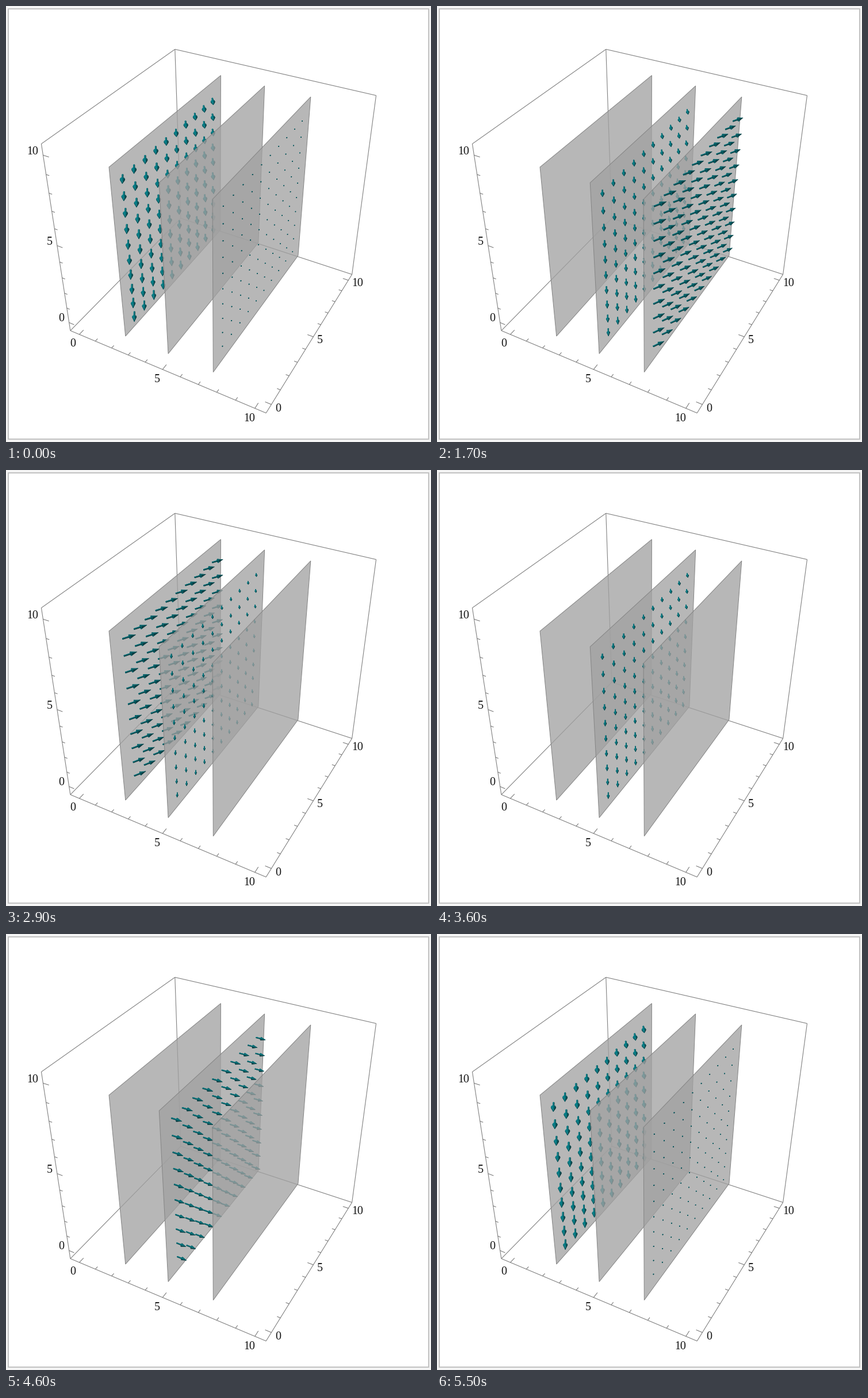
These frames come from a looping animation (739 px wide and 758 px high, 6000 ms). A matplotlib script:

```python
import itertools

import numpy as np
import matplotlib.pyplot as plt
from matplotlib.animation import FuncAnimation
from matplotlib.collections import LineCollection, PolyCollection
from matplotlib.patches import Polygon, Rectangle

W, H, DPI = 739, 758, 100
LO, HI = -0.57, 10.57
SLICES = (2.5, 5, 7.5)
SIDES = 10
TEAL = np.array([0.0, 0.50, 0.54])
LIGHT = np.array([-0.35, -0.40, 0.85])
PX = 72 / DPI

# Box corners and slice corners in space, with their places on the stage
BOX = {
    (LO, LO, LO): (112, 564), (HI, LO, LO): (452, 707), (HI, HI, LO): (601, 466),
    (LO, HI, LO): (303, 367), (LO, LO, HI): (61, 240), (LO, HI, HI): (294, 76),
    (HI, HI, HI): (643, 155),
}
SLICE_CORNERS = (
    ((208, 574), (179, 280), (373, 121), (373, 390)),
    ((282, 605), (266, 307), (450, 139), (440, 413)),
    ((360, 637), (360, 336), (530, 157), (508, 435)),
)

# Heading (degrees in the x-y plane) and length of the arrows on each slice
KEYS = (0, 5, 13, 25)
HEADINGS = ((-57, -108, -182, -300), (150, 58, -58, -60), (95, -62, -298, -620))
LENGTHS = ((0.70, 0.68, 0.66, 0.64), (0.53, 0.53, 0.50, 0.32), (0.62, 0.65, 0.62, 0.62))


def solve_camera():
    pairs = list(BOX.items())
    for x, corners in zip(SLICES, SLICE_CORNERS):
        space = ((x, 0, 0), (x, 0, 10), (x, 10, 10), (x, 10, 0))
        pairs += zip(space, corners)
    rows, rhs = [], []
    for (x, y, z), (u, v) in pairs:
        rows.append([x, y, z, 1, 0, 0, 0, 0, -u * x, -u * y, -u * z])
        rows.append([0, 0, 0, 0, x, y, z, 1, -v * x, -v * y, -v * z])
        rhs += [u, v]
    p = np.linalg.lstsq(np.array(rows, float), np.array(rhs, float), rcond=None)[0]
    return np.append(p, 1).reshape(3, 4)


CAM = solve_camera()
EYE = -np.linalg.inv(CAM[:, :3]) @ CAM[:, 3]


def project(points):
    h = np.asarray(points, float) @ CAM[:, :3].T + CAM[:, 3]
    return h[..., :2] / h[..., 2:]


def frustum(d, r0, s0, r1, s1):
    """Side faces between two rings at distances s0 and s1 along d."""
    a = np.linspace(0, 2 * np.pi, SIDES + 1)[:, None]
    across = np.array([-d[1], d[0], 0])
    rim = np.cos(a) * across + np.sin(a) * np.array([0, 0, 1])
    start, end = d * s0 + r0 * rim, d * s1 + r1 * rim
    return np.stack([start[:-1], start[1:], end[1:], end[:-1]], axis=1)


def arrow_parts(heading, size):
    """Direction, shaft faces and head faces, or None behind the slice."""
    t = np.radians(heading)
    d = np.array([np.cos(t), np.sin(t), 0])
    if d[0] < -0.1:
        return None
    if d[0] < 0:
        # lying in the slice: only the tail shows
        return d, frustum(d, 0.018, 0, 0.018, 0.03), frustum(d, 0, 0, 0.018, 0)
    thin, wide, neck = 0.052 * size, 0.16 * size, 0.52 * size
    shaft = np.concatenate([frustum(d, thin, 0, thin, neck), frustum(d, 0, 0, thin, 0)])
    head = np.concatenate([frustum(d, wide, neck, 0, size), frustum(d, 0, neck, wide, neck)])
    return d, shaft, head


def arrow_polys(x, heading, size):
    parts = arrow_parts(heading, size)
    if parts is None:
        return [], []
    d, shaft, head = parts
    to_eye = EYE - np.array([x, 5, 5])
    order = (shaft, head) if d @ to_eye > 0 else (head, shaft)
    faces = np.concatenate(order)
    normals = np.cross(faces[:, 2] - faces[:, 0], faces[:, 3] - faces[:, 1])
    normals /= np.linalg.norm(normals, axis=1, keepdims=True)
    seen = normals @ to_eye > 0
    faces, normals = faces[seen], normals[seen]
    shade = 0.40 + 0.62 * np.clip(normals @ LIGHT, 0, 1)
    polys = project(TAILS[x][:, None, None] + faces).reshape(-1, 4, 2)
    return polys, np.tile(shade[:, None] * TEAL, (len(TAILS[x]), 1))


steps = 10 * np.arange(1, 11) / 11
TAILS = {x: np.array([(x, y, z) for y, z in itertools.product(steps[::-1], steps)])
         for x in SLICES}

fig = plt.figure(figsize=(W / DPI, H / DPI), dpi=DPI, facecolor="#f4f4f4")
ax = fig.add_axes((0, 0, 1, 1))
ax.set_xlim(0, W)
ax.set_ylim(H, 0)
ax.axis("off")
ax.add_patch(Rectangle((4, 4.5), 730.5, 748, fc="white", ec="#c2c2c2", lw=2 * PX))

# Box edges that do not touch the nearest corner
edges = [project((a, b)) for a, b in itertools.combinations(BOX, 2)
         if sum(p != q for p, q in zip(a, b)) == 1]
ax.add_collection(LineCollection(edges, colors="#808080", linewidths=1.1 * PX, zorder=1))

ticks = []
for n in range(11):
    k = 1 if n % 5 == 0 else 0.55
    ticks += [
        project([(n, LO, LO), (n, LO + 0.36 * k, LO)]),
        project([(HI, n, LO), (HI - 0.32 * k, n, LO)]),
        project([(LO, LO, n), (LO + 0.32 * k, LO, n)]),
    ]
ax.add_collection(LineCollection(ticks, colors="#707070", linewidths=1 * PX, zorder=1))

LABELS = (
    ((116.5, 587.5), (262.5, 649.5), (423, 717.5)),
    ((473, 700.5), (545.5, 581.5), (611.5, 482.5)),
    ((96.5, 543.5), (75.5, 410.5), (46, 253.5)),
)
for row in LABELS:
    for text, (u, v) in zip(("0", "5", "10"), row):
        ax.text(u, v, text, family="Liberation Serif", size=20 * PX,
                ha="center", va="center", color="#111111")

layers = []
for i, x in enumerate(SLICES):
    quad = project([(x, 0, 0), (x, 0, 10), (x, 10, 10), (x, 10, 0)])
    ax.add_patch(Polygon(quad, fc=(0.63, 0.63, 0.63, 0.764), ec="#858585",
                         lw=1 * PX, zorder=2 + 2 * i))
    layer = PolyCollection([], linewidths=0.2, zorder=3 + 2 * i)
    ax.add_collection(layer)
    layers.append(layer)


def update(frame):
    # hold, play forward, hold, play back
    step = max(0, min(frame - 4, 25, 55 - frame))
    for x, layer, headings, lengths in zip(SLICES, layers, HEADINGS, LENGTHS):
        heading = np.interp(step, KEYS, headings)
        polys, colors = arrow_polys(x, heading, np.interp(step, KEYS, lengths))
        layer.set_verts(polys)
        layer.set_visible(len(polys) > 0)
        if len(polys):
            layer.set_facecolor(colors)
            layer.set_edgecolor(colors)
    return layers


anim = FuncAnimation(fig, update, frames=60, interval=100, repeat=True, blit=False)
plt.show()
```
